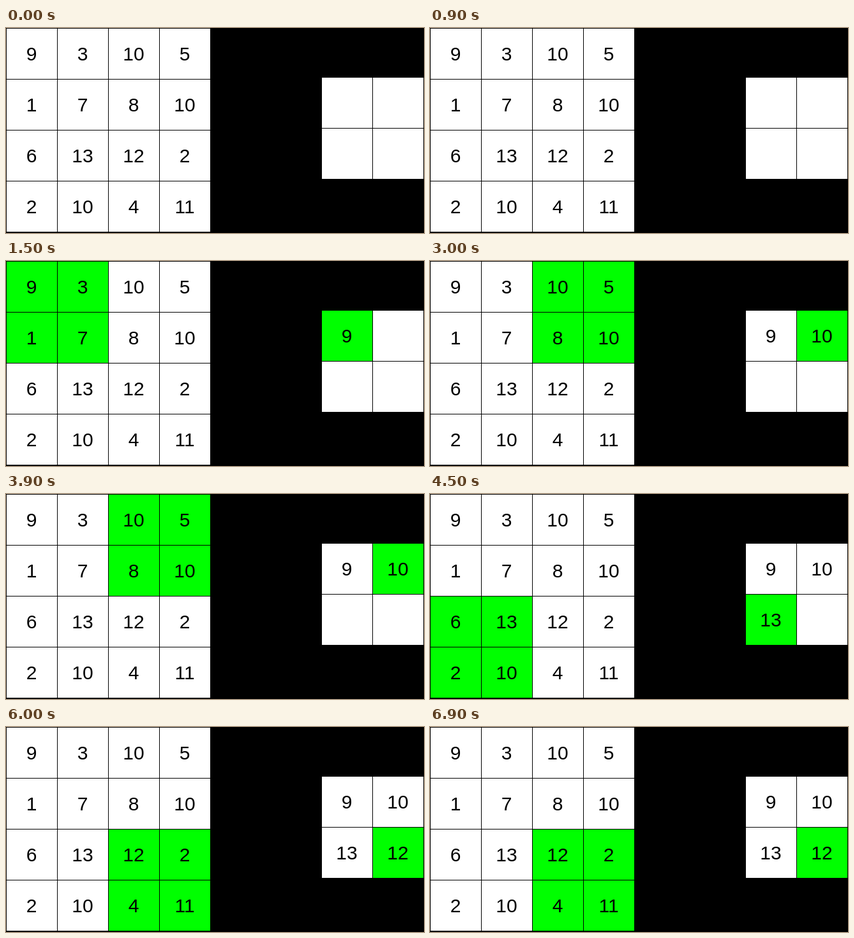
An HTML page that plays this animation: 655x322 px, repeating every 7.5 s.

```html
<!DOCTYPE html>
<html lang="en">
<head>
<meta charset="utf-8">
<title>Max pooling</title>
<style>
  html, body { margin: 0; width: 100%; height: 100%; overflow: hidden; background: #000; }
  svg { display: block; }
  text { font: 30px "Liberation Sans", Arial, Helvetica, sans-serif; text-anchor: middle; fill: #000; }
</style>
</head>
<body>
<svg id="stage" width="655" height="322" viewBox="0 0 655 322"></svg>
<script>
const STEP = 1500, STEPS = 5, PITCH = 80, SIZE = 79;
const WHITE = '#fff', GREEN = '#0f0';
const input = [
  [9, 3, 10, 5],
  [1, 7, 8, 10],
  [6, 13, 12, 2],
  [2, 10, 4, 11]
];
const stage = document.getElementById('stage');

function add(tag, attrs) {
  const node = document.createElementNS('http://www.w3.org/2000/svg', tag);
  for (const key in attrs) node.setAttribute(key, attrs[key]);
  return stage.appendChild(node);
}

function makeCell(left, top, row, col, value) {
  const x = left + col * PITCH, y = top + row * PITCH;
  const box = add('rect', { x, y, width: SIZE, height: SIZE, 'shape-rendering': 'crispEdges' });
  const label = add('text', { x: x + 39, y: y + 50 });
  label.textContent = value;
  return { box, label };
}

const inputCells = input.flatMap((line, row) => line.map((value, col) => ({
  ...makeCell(1, 1, row, col, value),
  pool: (row >> 1) * 2 + (col >> 1)
})));

const outputCells = [0, 1, 2, 3].map(pool => {
  const row = pool >> 1, col = pool & 1;
  const block = input.slice(row * 2, row * 2 + 2).flatMap(line => line.slice(col * 2, col * 2 + 2));
  return { ...makeCell(495, 78, row, col, Math.max(...block)), pool };
});

// Step 0 shows the bare input; each later step pools one 2x2 block.
function render(time) {
  const active = Math.floor(time / STEP) % STEPS - 1;
  for (const { box, pool } of [...inputCells, ...outputCells]) {
    box.setAttribute('fill', pool === active ? GREEN : WHITE);
  }
  for (const { label, pool } of outputCells) {
    label.setAttribute('visibility', pool <= active ? 'visible' : 'hidden');
  }
}

const start = performance.now();
function tick() {
  render(performance.now() - start);
  requestAnimationFrame(tick);
}
tick();
</script>
</body>
</html>
```
